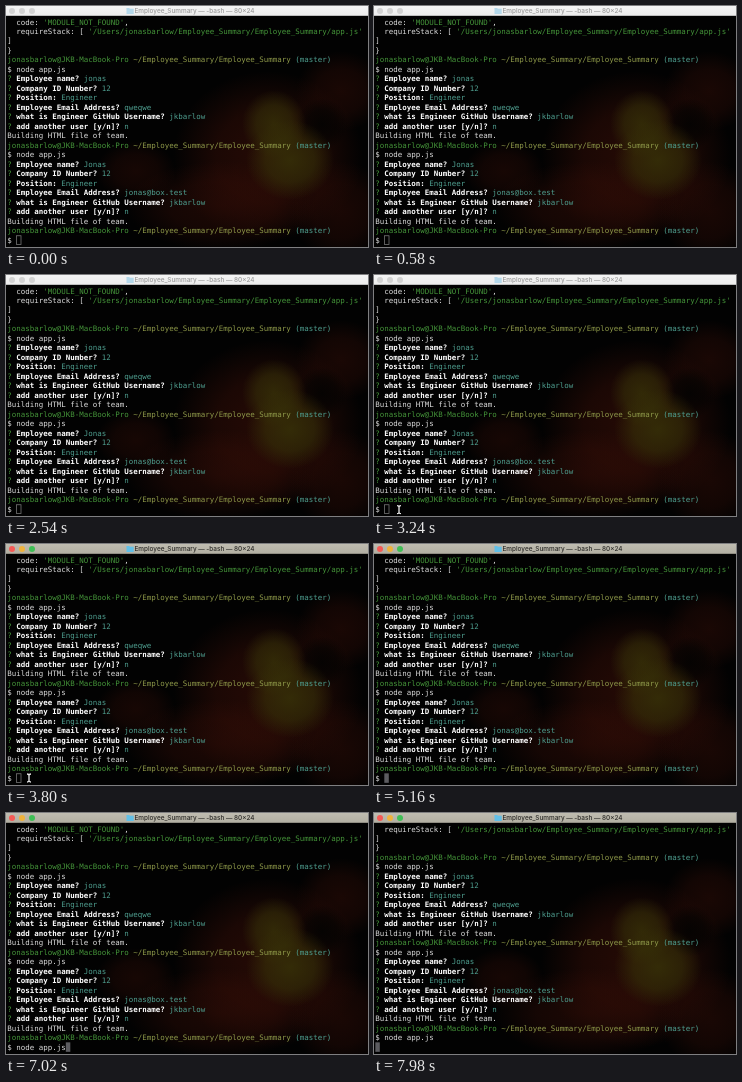
An HTML page with a canvas for the animation above (8000 ms loop, 362x241 px).

```html
<!DOCTYPE html>
<html lang="en">
<head>
<meta charset="utf-8">
<title>Terminal</title>
<style>
html, body { margin: 0; width: 100%; height: 100%; overflow: hidden; background: #000; }
canvas { display: block; width: 362px; height: 241px; }
</style>
</head>
<body>
<canvas id="stage"></canvas>
<script>
const W = 362, H = 241, LOOP = 8000;
const COL = 4.5, ROW = 9.48, LEFT = 1.3, FIRST = 16, ROWS = 24;
const BAR = 9.8;
const FOCUS = 3700, SOLID = 3900, TYPE_START = 5250, TYPE_STEP = 115, ENTER = 7760;
const MOUSE_IN = 2980, MOUSE_REST = 3400, MOUSE_OUT = 4600;
const COMMAND = 'node app.js';
const MONO = '7.475px "DejaVu Sans Mono", monospace';

const canvas = document.getElementById('stage');
const ctx = canvas.getContext('2d');
const ratio = window.devicePixelRatio || 1;
canvas.width = W * ratio;
canvas.height = H * ratio;

const COLORS = {
  plain: '#dcdcdc', bold: '#ffffff', green: '#45953a', olive: '#8f9a4a', teal: '#4f9f90'
};

// A line is a list of [text, style] spans.
const plain = text => [[text, 'plain']];
const prompt = [
  ['jonasbarlow@JKB-MacBook-Pro ', 'green'],
  ['~/Employee_Summary/Employee_Summary ', 'olive'],
  ['(master)', 'teal']
];
const ask = (question, answer) => [['? ', 'green'], [question + ' ', 'bold'], [answer, 'teal']];
const session = (name, mail) => [
  prompt,
  plain('$ ' + COMMAND),
  ask('Employee name?', name),
  ask('Company ID Number?', '12'),
  ask('Position:', 'Engineer'),
  ask('Employee Email Address?', mail),
  ask('what is Engineer GitHub Username?', 'jkbarlow'),
  ask('add another user [y/n]?', 'n'),
  plain('Building HTML file of team.')
];
const history = [
  [['  code: ', 'plain'], ["'MODULE_NOT_FOUND'", 'green'], [',', 'plain']],
  [['  requireStack: [ ', 'plain'],
   ["'/Users/jonasbarlow/Employee_Summary/Employee_Summary/app.js'", 'green']],
  plain(']'),
  plain('}'),
  ...session('jonas', 'qweqwe'),
  ...session('Jonas', 'jonas@box.test'),
  prompt
];

function glow(x, y, rx, ry, rgb, alpha) {
  ctx.save();
  ctx.translate(x, y);
  ctx.scale(rx, ry);
  const g = ctx.createRadialGradient(0, 0, 0, 0, 0, 1);
  g.addColorStop(0, `rgba(${rgb},${alpha})`);
  g.addColorStop(0.55, `rgba(${rgb},${alpha * 0.7})`);
  g.addColorStop(1, `rgba(${rgb},0)`);
  ctx.fillStyle = g;
  ctx.fillRect(-1, -1, 2, 2);
  ctx.restore();
}

function drawBackdrop() {
  ctx.fillStyle = '#020202';
  ctx.fillRect(0, 0, W, H);
  const red = '62,16,8', green = '56,52,8', dark = '4,3,2';
  glow(262, 150, 95, 85, red, 0.6);
  glow(215, 200, 95, 45, red, 0.45);
  glow(335, 85, 45, 40, red, 0.4);
  glow(335, 205, 50, 50, red, 0.4);
  glow(130, 165, 40, 30, red, 0.35);
  glow(316, 118, 26, 26, dark, 0.9);
  glow(268, 118, 32, 34, green, 0.75);
  glow(284, 154, 44, 40, green, 0.8);
}

function drawBar(focused) {
  const g = ctx.createLinearGradient(0, 0, 0, BAR);
  g.addColorStop(0, focused ? '#bfbcb0' : '#f4f4f4');
  g.addColorStop(1, focused ? '#b2afa2' : '#ececec');
  ctx.fillStyle = g;
  ctx.fillRect(0, 0, W, BAR);

  const lights = focused ? ['#f45a55', '#efb23c', '#3fbf55'] : ['#d2d2d2', '#d2d2d2', '#d2d2d2'];
  lights.forEach((color, i) => {
    ctx.fillStyle = color;
    ctx.beginPath();
    ctx.arc(6 + i * 10, 5, 3, 0, 7);
    ctx.fill();
  });

  ctx.fillStyle = focused ? '#62bfe6' : '#b4d8ea';
  ctx.fillRect(120.5, 2, 3, 1);
  ctx.fillRect(120.5, 2.7, 7.2, 5.3);

  ctx.fillStyle = focused ? '#2c2b28' : '#9a9a9a';
  ctx.font = '500 6.4px Inter, sans-serif';
  ctx.textAlign = 'center';
  ctx.fillText('Employee_Summary — -bash — 80×24', 188.5, 7.4);
}

function drawLine(spans, row) {
  const y = FIRST + row * ROW + 2.5;
  let col = 0;
  ctx.textAlign = 'left';
  for (const [text, style] of spans) {
    ctx.font = (style === 'bold' ? 'bold ' : '') + MONO;
    ctx.fillStyle = COLORS[style];
    for (const ch of text) ctx.fillText(ch, LEFT + COL * col++, y);
  }
}

function drawCursor(col, row, solid) {
  const x = LEFT + col * COL, y = FIRST + row * ROW - 4.7;
  ctx.fillStyle = '#5c5c60';
  ctx.strokeStyle = '#747474';
  ctx.lineWidth = 0.8;
  if (solid) ctx.fillRect(x, y, COL, ROW);
  else ctx.strokeRect(x + 0.2, y + 0.4, COL, ROW - 0.8);
}

function drawMouse(t) {
  if (t < MOUSE_IN || t >= MOUSE_OUT) return;
  const p = Math.min(1, (t - MOUSE_IN) / (MOUSE_REST - MOUSE_IN));
  const k = 1 - (1 - p) ** 3;
  const x = 60 - 37 * k, y = 246 - 12 * k;
  ctx.beginPath();
  for (const side of [-2, 2]) {
    ctx.moveTo(x + side, y - 4);
    ctx.quadraticCurveTo(x, y - 4, x, y - 2.5);
    ctx.lineTo(x, y + 2.5);
    ctx.quadraticCurveTo(x, y + 4, x + side, y + 4);
  }
  ctx.strokeStyle = '#e8e8e8';
  ctx.lineWidth = 1.3;
  ctx.stroke();
}

function draw(t) {
  ctx.setTransform(ratio, 0, 0, ratio, 0, 0);
  drawBackdrop();

  const typed = Math.max(0, Math.min(COMMAND.length, Math.floor((t - TYPE_START) / TYPE_STEP) + 1));
  const input = '$ ' + COMMAND.slice(0, typed);
  const entered = t >= ENTER;
  const lines = [...history, plain(input)];
  if (entered) lines.push(plain(''));

  drawCursor(entered ? 0 : input.length, ROWS - 1, t >= SOLID);
  lines.slice(-ROWS).forEach(drawLine);
  drawBar(t >= FOCUS);
  drawMouse(t);
}

const start = performance.now();
function tick() {
  draw((performance.now() - start) % LOOP);
  requestAnimationFrame(tick);
}
tick();
</script>
</body>
</html>
```
